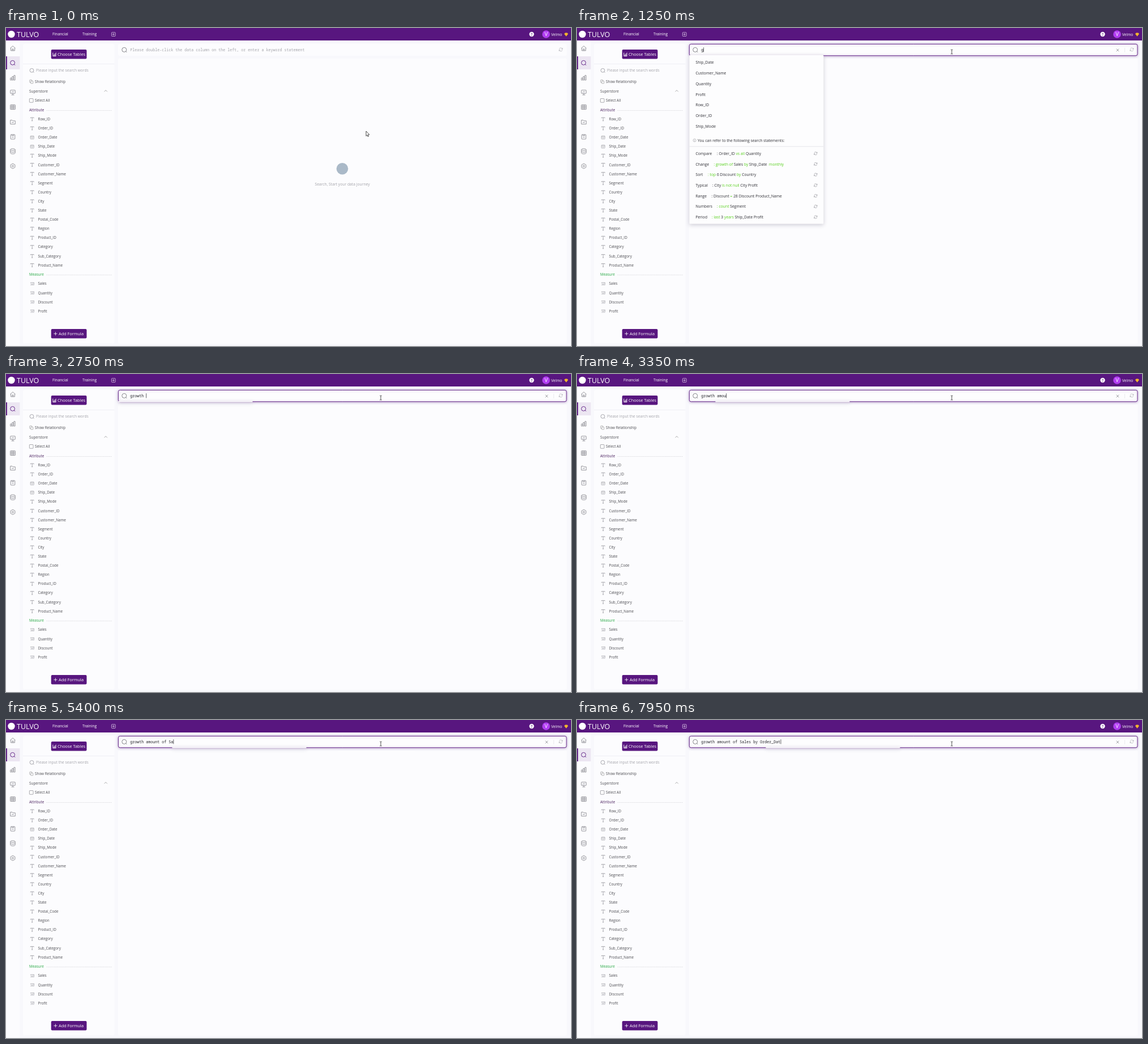
Recreate the animation shown at these times as an HTML page with a canvas. Size 998x561 px, loop 8 s.

```html
<!DOCTYPE html>
<html lang="en">
<head>
<meta charset="utf-8">
<title>Data search</title>
<style>
html, body { margin: 0; width: 100%; height: 100%; overflow: hidden; background: #f8f8fc; }
canvas { display: block; width: 998px; height: 561px; }
</style>
</head>
<body>
<canvas id="stage"></canvas>
<script>
const W = 998, H = 561, LOOP = 8000;
const SANS = '"Open Sans", "Noto Sans", sans-serif';
const MONO = '"Noto Sans Mono", "DejaVu Sans Mono", monospace';
const PURPLE = '#58167f', INK = '#4b4b50', DARK = '#303036', SOFT = '#a5a5ab', GREEN = '#57d01c';

const canvas = document.getElementById('stage');
const ctx = canvas.getContext('2d');
const dpr = window.devicePixelRatio || 1;
canvas.width = W * dpr;
canvas.height = H * dpr;

const attributes = ['Row_ID', 'Order_ID', 'Order_Date', 'Ship_Date', 'Ship_Mode', 'Customer_ID',
  'Customer_Name', 'Segment', 'Country', 'City', 'State', 'Postal_Code', 'Region', 'Product_ID',
  'Category', 'Sub_Category', 'Product_Name'];
const measures = ['Sales', 'Quantity', 'Discount', 'Profit'];
const hints = ['Ship_Date', 'Customer_Name', 'Quantity', 'Profit', 'Row_ID', 'Order_ID', 'Ship_Mode'];

// Keywords between asterisks are green.
const samples = [
  ['Compare', 247, ': Order_ID *vs all* Quantity'],
  ['Change', 241.5, '*: growth of* Sales *by* Ship_Date  *monthly*'],
  ['Sort', 231, '*: top* 6 Discount *by* Country'],
  ['Typical', 239, ': City *is not null* City Profit'],
  ['Range', 237.5, ': Discount *=* 28 Discount Product_Name'],
  ['Numbers', 247, '*: count* Segment'],
  ['Period', 238, '*: last* 3 *years* Ship_Date Profit']
];

const query = 'growth amount of Sales by Order_Dat';
const keyTimes = [
  1200, 1400, 1600, 1850, 2100, 2350, 2650,
  2900, 3050, 3200, 3300, 3450, 3600, 3750, 3950, 4100, 4250,
  5150, 5350, 5500, 5600, 5700, 5800, 5900, 6000, 6200,
  6500, 6850, 6950, 7050, 7100, 7450, 7600, 7850, 7950
];
const ACTIVE_AT = 950, COLLAPSE_AT = 1500;
const popupStops = [[ACTIVE_AT, 198], [3050, 244], [5300, 293], [6700, 333]];

function text(str, x, y, size, color = INK, opt = {}) {
  ctx.font = `${opt.weight || 400} ${size}px ${opt.font || SANS}`;
  ctx.textAlign = opt.align || 'left';
  ctx.fillStyle = color;
  ctx.fillText(str, x, y + size * 0.36);
  return ctx.measureText(str).width;
}

function box(x, y, w, h, r, fill, stroke, lw = 1) {
  ctx.beginPath();
  ctx.roundRect(x, y, w, h, r);
  if (fill) { ctx.fillStyle = fill; ctx.fill(); }
  if (stroke) { ctx.strokeStyle = stroke; ctx.lineWidth = lw; ctx.stroke(); }
}

function disc(x, y, r, fill) {
  ctx.beginPath();
  ctx.arc(x, y, r, 0, 7);
  ctx.fillStyle = fill;
  ctx.fill();
}

function ring(x, y, r, color, lw = 0.7, from = 0, to = Math.PI * 2) {
  ctx.beginPath();
  ctx.arc(x, y, r, from, to);
  ctx.strokeStyle = color;
  ctx.lineWidth = lw;
  ctx.stroke();
}

// Each stroke is a flat list of x, y pairs relative to (x, y).
function lines(x, y, color, lw, ...strokes) {
  ctx.beginPath();
  for (const p of strokes)
    for (let i = 0; i < p.length; i += 2)
      ctx[i ? 'lineTo' : 'moveTo'](x + p[i], y + p[i + 1]);
  ctx.strokeStyle = color;
  ctx.lineWidth = lw;
  ctx.stroke();
}

function shadowed(color, blur, dy, draw) {
  ctx.save();
  ctx.shadowColor = color;
  ctx.shadowBlur = blur * dpr;
  ctx.shadowOffsetY = dy * dpr;
  draw();
  ctx.restore();
}

function magnifier(x, y, r, color, lw = 0.7) {
  ring(x, y, r, color, lw);
  lines(x, y, color, lw, [r * 0.7, r * 0.7, r * 1.15, r * 1.15]);
}

function refresh(x, y, r, color) {
  ring(x, y, r, color, 0.6, 0.3, 2.9);
  ring(x, y, r, color, 0.6, 3.45, 6.05);
  lines(x, y, color, 0.6, [r, -r, r, -r * 0.2, r * 0.3, -r * 0.2], [-r, r, -r, r * 0.2, -r * 0.3, r * 0.2]);
}

function topBar() {
  ctx.fillStyle = PURPLE;
  ctx.fillRect(0, 0, W, 22);
  disc(9.5, 11, 6.2, '#fff');
  text('TULVO', 19, 11, 12.5, '#fff', { weight: 500 });
  text('Financial', 82, 11, 6.8, '#fff');
  text('Training', 135, 11, 6.8, '#fff');
  box(186.4, 7.7, 6.8, 6.8, 1, null, '#eadff2', 0.7);
  lines(189.8, 11.1, '#eadff2', 0.7, [-2, 0, 2, 0], [0, -2, 0, 2]);
  disc(928.5, 11, 4.2, '#fff');
  text('?', 928.5, 11.2, 6.5, PURPLE, { align: 'center', weight: 600 });
  disc(954, 11, 6.8, '#b23df2');
  text('V', 954, 11, 9.5, '#fff', { align: 'center' });
  text('Velmo', 963, 11.2, 6.6, '#fff');
  ctx.beginPath();
  [[986, 10.6], [987.7, 8.6], [991.3, 8.6], [993, 10.6], [989.5, 14.7]].forEach(p => ctx.lineTo(...p));
  ctx.fillStyle = '#f3b52c';
  ctx.fill();
}

function rail() {
  ctx.fillStyle = '#fcfcfe';
  ctx.fillRect(0, 22, 24.5, H - 22);
  ctx.fillStyle = '#ece6f2';
  ctx.fillRect(0, 50, 24.5, 23);
  ctx.fillStyle = PURPLE;
  ctx.fillRect(0, 50, 1.8, 23);
  const c = '#77777e', x = 12, lw = 0.75;
  lines(x, 36, c, lw, [-4.5, -0.3, 0, -4.3, 4.5, -0.3], [-3.4, -1, -3.4, 4, 3.4, 4, 3.4, -1], [-1, 4, -1, 1, 1, 1, 1, 4]);
  magnifier(11.6, 61.3, 3.9, PURPLE, 0.9);
  box(7.7, 88, 2.2, 4, 0.3, null, c, lw);
  box(10.8, 85.5, 2.2, 6.5, 0.3, null, c, lw);
  box(13.9, 83.5, 2.2, 8.5, 0.3, null, c, lw);
  box(7.7, 109.6, 8.6, 5.8, 0.6, null, c, lw);
  lines(x, 114, c, lw, [0, 1.5, 0, 4], [-2.5, 4, 2.5, 4], [-2.2, -0.5, -0.5, -2, 0.6, -0.8, 2.2, -2.4]);
  box(7.7, 135.6, 8.6, 8, 0.4, null, c, lw);
  lines(x, 139.6, c, lw, [-4.3, -1.4, 4.3, -1.4], [-4.3, 1.3, 4.3, 1.3], [-1.4, -4, -1.4, 4], [1.4, -4, 1.4, 4]);
  lines(x, 166, c, lw, [-4.3, 3.5, -4.3, -3.5, -1, -3.5, 0, -2.2, 4.3, -2.2, 4.3, 3.5, -4.3, 3.5], [-1.8, 0.6, 1.8, 0.6]);
  box(8.2, 188, 7.6, 8, 0.8, null, c, lw);
  lines(x, 192, c, lw, [-1.5, -4.2, -1.5, -2, 1.5, -2, 1.5, -4.2], [-1.5, 0.8, 1.5, 0.8]);
  ctx.beginPath();
  ctx.ellipse(x, 214.5, 4.2, 1.6, 0, 0, 7);
  for (const y of [217.6, 220.5]) {
    ctx.moveTo(7.8, y);
    ctx.ellipse(x, y, 4.2, 1.6, 0, Math.PI, 0, true);
  }
  ctx.moveTo(7.8, 214.5); ctx.lineTo(7.8, 220.5);
  ctx.moveTo(16.2, 214.5); ctx.lineTo(16.2, 220.5);
  ctx.stroke();
  ctx.beginPath();
  for (let i = 0; i < 6; i++) {
    const a = i * Math.PI / 3 + Math.PI / 6;
    ctx.lineTo(x + 4.5 * Math.cos(a), 243.6 + 4.5 * Math.sin(a));
  }
  ctx.closePath();
  ctx.stroke();
  ring(x, 243.6, 1.5, c, lw);
}

function section(label, y, color, from) {
  text(label, 41, y, 6.35, color);
  ctx.setLineDash([1.6, 1.1]);
  lines(0, y + 0.5, '#cfcfd5', 0.7, [from, 0, 187, 0]);
  ctx.setLineDash([]);
}

function button(label, y, x) {
  box(79.7, y, 62.8, 16.6, 2, PURPLE);
  text(label, x, y + 8.5, 7.35, '#fff');
}

function sidePanel() {
  box(30, 28, 161.5, 528.5, 3, '#fcfcfe');
  button('Choose Tables', 38, 91);
  lines(82.4, 49.5, '#fff', 0.9, [0.4, -6, 0.4, 0, 6, 0], [2.3, -0.4, 2.3, -3], [4, -0.4, 4, -4.5], [5.7, -0.4, 5.7, -6]);
  lines(0, 63.5, '#ededf2', 0.8, [30, 0, 191.5, 0]);
  magnifier(45.5, 74.8, 3.4, '#85858c');
  text('Please input the search words', 53, 75, 6.65, SOFT);
  box(41.8, 91.6, 4, 4.6, 0.5, null, '#888', 0.6);
  box(43.8, 93.6, 4, 4.2, 0.5, '#fcfcfe', '#888', 0.6);
  text('Show Relationship', 51, 95, 6.35);
  text('Superstore', 41, 111.7, 6.4);
  lines(176.2, 111, '#888', 0.7, [-2.6, 1.3, 0, -1.3, 2.6, 1.3]);
  box(41.4, 124.6, 6.6, 6.6, 0.6, '#fff', '#85858c', 0.7);
  text('Select All', 51, 128.2, 6.35);
  section('Attribute', 145, '#4c2360', 71.5);

  attributes.forEach((name, i) => {
    const y = 160.8 + i * 16.1;
    text(name, 56.5, y, 6.32);
    if (name.endsWith('Date')) {
      box(43.2, y - 2.6, 6, 5.4, 0.6, null, '#8d8d94', 0.6);
      lines(46.2, y, '#8d8d94', 0.6, [-3, -0.9, 3, -0.9], [-1.3, 1, 1.3, 1]);
    } else {
      lines(46.2, y, '#8d8d94', 0.7, [-2.9, -1.6, -2.9, -2.8, 2.9, -2.8, 2.9, -1.6], [0, -2.8, 0, 2.9], [-1.2, 2.9, 1.2, 2.9]);
    }
  });

  section('Measure', 435.2, '#27a844', 71.5);
  measures.forEach((name, i) => {
    const y = 451.2 + i * 16.1;
    text(name, 56.5, y, 6.32);
    text('123', 46.4, y, 4.4, '#77777e', { align: 'center' });
    lines(46.4, y, '#a0a0a6', 0.45, [-3.4, -2.2, 3.4, -2.2], [-3.4, 2.3, 3.4, 2.3]);
  });

  button('Add Formula', 531, 93);
  lines(87.4, 539.3, '#fff', 0.8, [-3, 0, 3, 0], [0, -3, 0, 3]);
}

function mainPanel(active) {
  box(198, 53.5, 792.5, 503.5, 3, '#fcfcfe');
  if (active) return;
  disc(594, 248.3, 10.3, '#aab9c8');
  text('Search, Start your data journey', 594, 275.5, 6.75, SOFT, { align: 'center' });
}

function popup(t) {
  const x = popupStops.filter(s => t >= s[0]).pop()[1];
  const open = t < COLLAPSE_AT;
  shadowed('rgba(40,30,70,.22)', 7, 2, () => box(x + 0.5, 47.8, 237, open ? 297.7 : 1.6, open ? 1.5 : 0, '#fdfdfe'));
  if (!open) return;
  hints.forEach((name, i) => text(name, 209.5, 61 + i * 18.7, 6.9, DARK));
  ring(207.7, 198.2, 2.6, '#8a8a90', 0.5);
  lines(207.7, 198.2, '#8a8a90', 0.6, [0, -1.6, 0, -0.9], [0, -0.3, 0, 1.6]);
  text('You can refer to the following search statements:', 213, 198.2, 6.75, DARK);
  lines(0, 209, '#dedee4', 0.8, [198.5, 0, 435.5, 0]);
  samples.forEach(([label, start, phrase], i) => {
    const y = 221.5 + i * 18.7;
    text(label, 209.5, y, 6.75, DARK);
    let pen = start;
    phrase.split('*').forEach((part, k) => {
      pen += text(part, pen, y, 6.75, k % 2 ? GREEN : DARK, { weight: k % 2 ? 500 : 400 });
    });
    refresh(421.5, y - 0.2, 2.6, '#8a8a90');
  });
}

function searchBar(t) {
  const active = t >= ACTIVE_AT;
  const typed = keyTimes.filter(k => t >= k).length;
  if (active)
    shadowed('rgba(88,22,127,.35)', 4, 0.5, () => box(198.4, 28.4, 791.6, 20.4, 3, '#fdfdfe', PURPLE, 0.9));
  else
    box(198, 28, 792.5, 21, 3, '#fcfcfe');
  if (active) popup(t);

  magnifier(208.8, 38.4, 4, '#66666c', 0.8);
  refresh(980, 38, 3, '#a5a5ab');
  if (typed) {
    text(query.slice(0, typed), 219.2, 38.3, 6.68, '#222228', { font: MONO });
    lines(955, 39, '#77777e', 0.7, [-2.3, -2.3, 2.3, 2.3], [-2.3, 2.3, 2.3, -2.3]);
    lines(967.5, 39, '#e2e2e8', 0.7, [0, -4, 0, 4]);
  } else {
    text('Please double-click the data column on the left, or enter a keyword statement',
      219.2, 38.3, 6.68, SOFT, { font: MONO });
  }
  const since = t - (typed ? keyTimes[typed - 1] : ACTIVE_AT);
  if (active && since % 1000 < 500) {
    ctx.fillStyle = '#222228';
    ctx.fillRect(219.4 + typed * 4.008, 34.2, 0.7, 8.2);
  }
}

function pointer(t) {
  const u = Math.min(1, Math.max(0, (t - 50) / 800));
  const e = u * u * (3 - 2 * u);
  const x = 636 + 26 * e, y = 182 - 140 * e;
  if (y < 49) {
    lines(x, y, '#222', 0.8, [-1.7, -3.8, -0.5, -3.8, 0, -3.3, 0.5, -3.8, 1.7, -3.8],
      [0, -3.4, 0, 3.4], [-1.7, 3.8, -0.5, 3.8, 0, 3.3, 0.5, 3.8, 1.7, 3.8]);
    return;
  }
  ctx.beginPath();
  [[0, 0], [0, 8.6], [1.9, 6.8], [3.2, 9.7], [4.5, 9.1], [3.3, 6.3], [5.9, 6.1]]
    .forEach(([dx, dy]) => ctx.lineTo(x + dx, y + dy));
  ctx.closePath();
  ctx.fillStyle = '#fff';
  ctx.fill();
  ctx.strokeStyle = '#222';
  ctx.lineWidth = 0.8;
  ctx.stroke();
}

function draw(t) {
  ctx.setTransform(dpr, 0, 0, dpr, 0, 0);
  ctx.fillStyle = '#f8f8fc';
  ctx.fillRect(0, 0, W, H);
  topBar();
  rail();
  sidePanel();
  mainPanel(t >= ACTIVE_AT);
  searchBar(t);
  pointer(t);
}

const begin = performance.now();
function tick() {
  draw((performance.now() - begin) % LOOP);
  requestAnimationFrame(tick);
}
tick();
</script>
</body>
</html>
```
